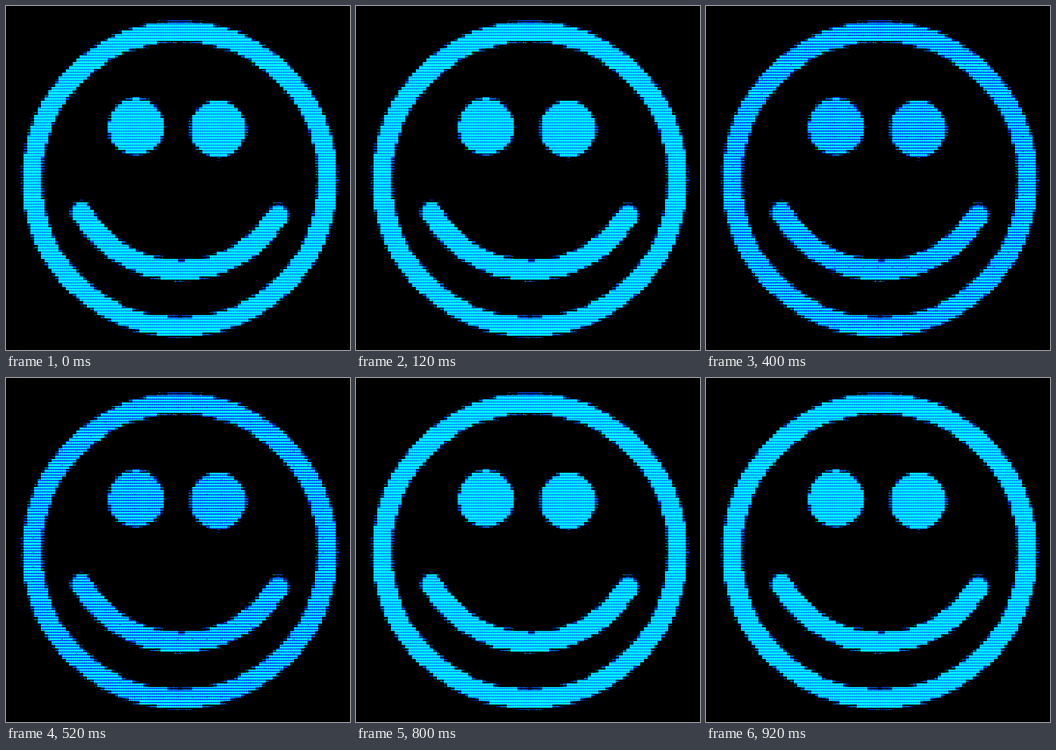
These frames come from a looping animation (748x748 px, 1 s). An HTML page with a canvas:

```html
<!DOCTYPE html>
<html lang="en">
<head>
<meta charset="utf-8">
<title>Scanline smiley</title>
<style>
  html, body { margin: 0; width: 100%; height: 100%; overflow: hidden; background: #000; }
  #stage { position: relative; width: 748px; height: 748px; animation: lines 1s step-end infinite; }
  #dots, canvas { position: absolute; inset: 0; display: block; }
  #dots {
    background: radial-gradient(circle, #000 1.2px, transparent 1.7px) 11.75px -14.75px / 31.5px 31.5px;
    animation: dots 1s step-end infinite;
  }
  @keyframes lines {
    0%, 80%, 100% { background-color: #0096ff; }
    20% { background-color: #0078ff; }
    40% { background-color: #0050ff; }
    60% { background-color: #0020ff; }
  }
  @keyframes dots {
    0%, 80%, 100% { opacity: 0; }
    20% { opacity: .25; }
    40% { opacity: .5; }
    60% { opacity: .6; }
  }
</style>
</head>
<body>
<div id="stage"><canvas id="face" width="748" height="748"></canvas><div id="dots"></div></div>
<script>
const SIZE = 748, CELLS = 98, CELL = SIZE / CELLS;
const PITCH = CELL * .8, PHASE = 3.3;
const ctx = document.getElementById('face').getContext('2d');

// Coarse coverage of the face, one value per cell
function coverage() {
  const small = document.createElement('canvas');
  small.width = small.height = CELLS;
  const g = small.getContext('2d');
  g.scale(1 / CELL, 1 / CELL);
  const disc = (x, y, r) => { g.beginPath(); g.arc(x, y, r, 0, Math.PI * 2); };
  g.lineWidth = 41;
  disc(378, 377, 321.5);
  g.stroke();
  disc(283, 262.5, 61.5);
  g.fill();
  disc(461, 268, 61.5);
  g.fill();
  g.lineWidth = 44;
  g.lineCap = 'round';
  g.stroke(new Path2D('M164 449 A248 248 0 0 0 592 455'));
  return g.getImageData(0, 0, CELLS, CELLS).data;
}

let seed = 7;
const random = () => (seed = seed * 16807 % 2147483647) / 2147483647;

// Distance from a pixel row to the nearest dark scanline
function lineDistance(y) {
  const p = (y + .5 - PHASE + PITCH) % PITCH;
  return Math.min(p, PITCH - p);
}

function bar(x, y, w, color) {
  ctx.fillStyle = color;
  ctx.fillRect(x, y, w, 1);
}

// The animated line colour shows through the gaps, whose rims are beaded
function solidRow(x0, x1, y, d) {
  if (d > 1.9) return bar(x0, y, x1 - x0, '#00ffff');
  ctx.clearRect(x0, y, x1 - x0, 1);
  if (d < 1) return;
  for (let x = x0; x < x1; x++) {
    if (x % 4 < 2) bar(x, y, 1, '#00ffff');
  }
}

function drawCell(col, row, cover) {
  const x0 = Math.round(col * CELL), x1 = Math.round((col + 1) * CELL);
  const y0 = Math.round(row * CELL), y1 = Math.round((row + 1) * CELL);
  for (let y = y0; y < y1; y++) {
    const d = lineDistance(y);
    if (cover > .6) solidRow(x0, x1, y, d);
    else if (cover > .3 && d > 1.3) bar(x0, y, x1 - x0, '#0048e0');
    else if (d > 2) bar(x0, y, x1 - x0, '#0024a0');
    if (cover < .6 && d > 1.8 && random() < .35) {
      bar(x0 + Math.floor(random() * 5), y, 3, '#00c800');
    }
  }
}

ctx.fillStyle = '#000';
ctx.fillRect(0, 0, SIZE, SIZE);
const cover = coverage();
for (let row = 0; row < CELLS; row++) {
  for (let col = 0; col < CELLS; col++) {
    const a = cover[(row * CELLS + col) * 4 + 3] / 255;
    if (a > .08) drawCell(col, row, a);
  }
}
</script>
</body>
</html>
```
